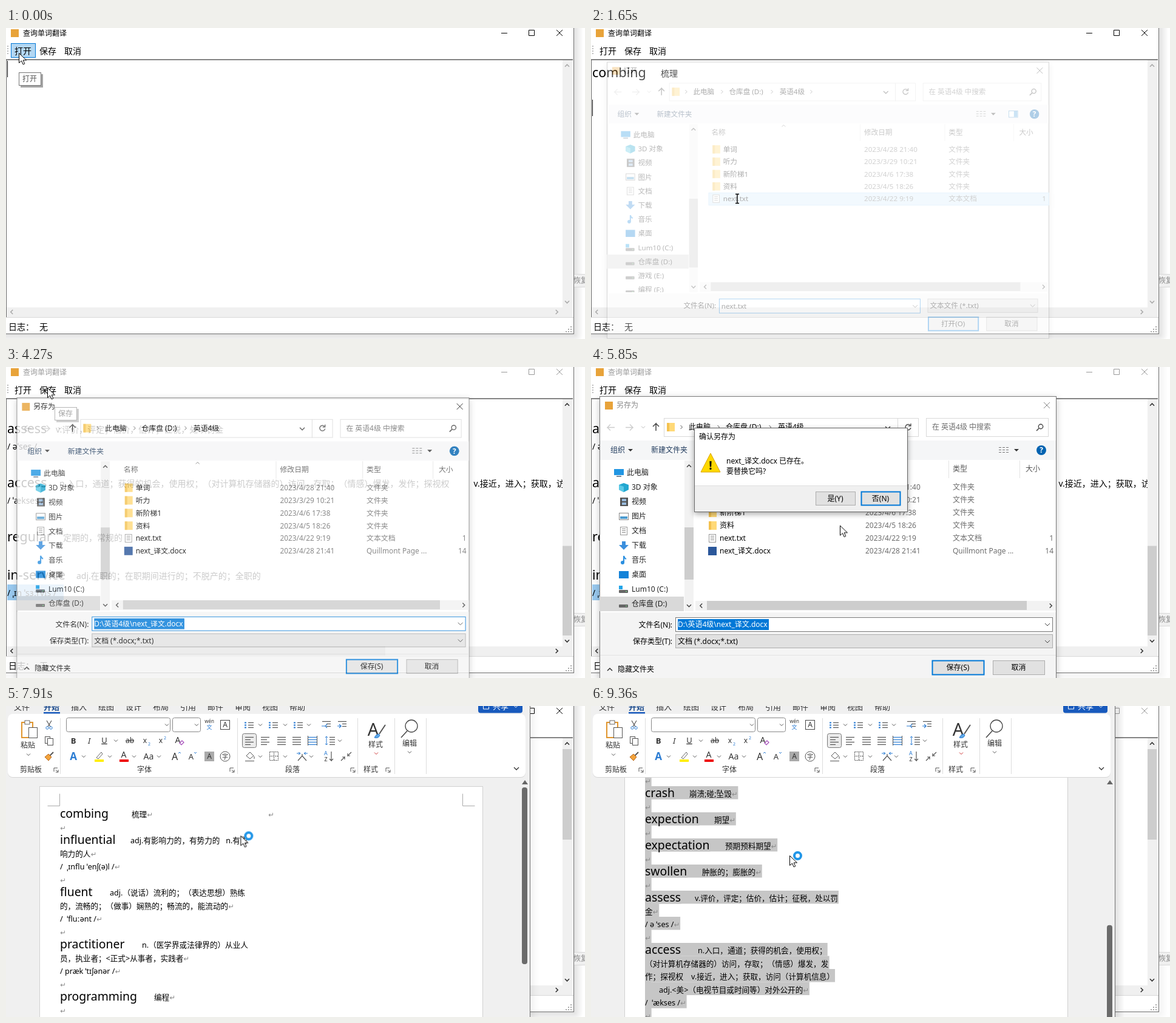
An HTML page for the animation above (9420 ms loop, 954 px wide and 512 px high).

```html
<!DOCTYPE html>
<html lang="zh-CN">
<head>
<meta charset="utf-8">
<title>查询单词翻译</title>
<style>
html,body{margin:0;width:100%;height:100%;overflow:hidden;background:#fff}
#stage{display:block;width:954px;height:512px}
text{font-family:"Noto Sans","Noto Sans CJK SC","Noto Sans CJK",sans-serif;white-space:pre;text-spacing-trim:space-all}
.ret{font-family:"DejaVu Sans",sans-serif;font-size:11.5px;fill:#8a8a8a}
.dlg{transform-origin:390px 283px;filter:drop-shadow(0 3px 6px rgba(0,0,0,.22))}
#word{transform-origin:422px 290px}
#confirm{filter:drop-shadow(0 3px 5px rgba(0,0,0,.35))}
</style>
</head>
<body>
<svg id="stage" viewBox="0 0 954 512"></svg>
<script>
const LOOP = 9420, BLUE = '#0078d7', LINE = '#d9d9d9';

// Drawing helpers
const R = (x, y, w, h, fill, more = '') => `<rect x="${x}" y="${y}" width="${w}" height="${h}" fill="${fill}" ${more}/>`;
const T = (x, y, s, size = 12, fill = '#000', more = '') =>
  `<text x="${x}" y="${y + size * .37}" font-size="${size}" fill="${fill}" ${more}>${s.replace(/</g, '&lt;')}</text>`;
const P = (d, stroke = '#444', w = 1, more = 'fill="none"') => `<path d="${d}" stroke="${stroke}" stroke-width="${w}" ${more}/>`;
const C = (x, y, r, fill, more = '') => `<circle cx="${x}" cy="${y}" r="${r}" fill="${fill}" ${more}/>`;
const G = (id, body, more = '') => `<g id="${id}" ${more}>${body}</g>`;
const clip = (x, y, w, h, body) => `<svg x="${x}" y="${y}" width="${w}" height="${h}" viewBox="${x} ${y} ${w} ${h}">${body}</svg>`;
const chev = (x, y, turn = 0, c = '#555', r = 3, w = 1) =>
  P(`M${x - r} ${y - r / 2}l${r} ${r}l${r} ${-r}`, c, w, `fill="none" transform="rotate(${turn} ${x} ${y})"`);
const tri = (x, y) => `<path d="M${x - 4} ${y - 2}h8l-4 4z" fill="#333"/>`;
const mid = 'text-anchor="middle"', end = 'text-anchor="end"';
const button = (x, y, w, h, s, main) =>
  R(x + .5, y + .5, w, h, '#e1e1e1', `stroke="${main ? BLUE : '#adadad'}" stroke-width="${main ? 2 : 1}"`) + T(x + w / 2, y + h / 2 + .5, s, 12, '#000', mid);
const shadow = (right, bottom) => [1, 2, 3, 4, 5, 6, 7]
  .map(k => R(-20, -20, right + 20 + k * 2, bottom + 20 + k * 2, '#000', `opacity=".016" rx="${k * 2}"`)).join('');

// Timeline helpers
const rules = [];
const anim = (id, frames, ease = 'linear') => {
  const all = [...frames, [LOOP, frames.at(-1)[1]]];
  rules.push(`@keyframes ${id}{${all.map(([t, css]) => `${(t / LOOP * 100).toFixed(3)}%{${css}}`).join('')}}
#${id}{animation:${id} ${LOOP}ms ${ease} infinite}`);
};
const steps = (id, frames, css) => anim(id, frames.map(([t, ...v]) => [t, css(...v)]), 'step-end');
const show = (id, ...times) => steps(id, [[0, 0], ...times.map((t, i) => [t, (i + 1) % 2])], v => `opacity:${v}`);
const fade = (id, ...frames) => anim(id, frames.map(([t, o, s = 1]) => [t, `opacity:${o};transform:scale(${s})`]));
const color = (id, ...frames) => steps(id, frames, c => `color:${c}`);

// word, editor x, document x, meaning (| breaks document lines), phonetics, time it appears
const entries = [
  ['combing', 115, 207, '梳理', '', 1590],
  ['influential', 112, 205, 'adj.有影响力的，有势力的   n.有影|响力的人', '/ ˌɪnfluˈenʃ(ə)l /', 2010],
  ['fluent', 80, 171, 'adj.（说话）流利的；（表达思想）熟练|的，流畅的；（做事）娴熟的；畅流的，能流动的', '/ ˈfluːənt /', 2250],
  ['practitioner', 140, 224, 'n.（医学界或法律界的）从业人|员，执业者；<正式>从事者，实践者', '/ prækˈtɪʃənər /', 2250],
  ['programming', 162, 244, '编程', '', 2250],
  ['crash', 75, 162, '崩溃;碰;坠毁', '', 2310],
  ['expection', 120, 203, '期望', '', 2310],
  ['expectation', 140, 221, '预期预料期望', '', 2370],
  ['swollen', 98, 183, '肿胀的；膨胀的', '', 2370],
  ['assess', 82, 171, 'v.评价，评定；估价，估计；征税，处以罚|金', '/ əˈses /', 2430],
  ['access', 88, 176, 'n.入口，通道；获得的机会，使用权；|（对计算机存储器的）访问，存取；（情感）爆发，发|作；探视权           v.接近，进入；获取，访问（计算机信息）|       adj.<美>（电视节目或时间等）对外公开的', '/ ˈækses /', 2430],
  ['regular', 94, 183, '定期的，常规的', '', 2610],
  ['in-service', 116, 200, 'adj.在职的；在职期间进行的；不脱产的；全职的', '/ ˌɪn ˈsɜːrvɪs /', 2730],
];

// Editor text and its scrolling
let ey = 53, lines = '';
const scrolls = [[0, 0, 0, 0]];
entries.forEach(([word, x, , def, phon, at], i) => {
  const row = (dy, h) => `data-top="${ey + dy}" data-h="${h}"`;
  let body = T(2, ey + 20, word, 21.5, '#000', row(0, 36)) + T(x, ey + 22, def.replace(/\|/g, ''), 14, '#000', row(0, 36));
  if (phon) body += T(2, ey + 50, phon, 14, '#000', row(36, 26));
  lines += G('e' + i, body);
  show('e' + i, at);
  ey += phon ? 89 : 63;
  const full = ey - 53 + 49;
  if (full > 430) scrolls.push([at, full - 407, 371 * (full - 407) / full, 371 * 407 / full]);
});
const total = ey - 53;
scrolls.push([7700, 0, 0, 149]);
steps('scroll', scrolls, y => `transform:translateY(${-y}px)`);
steps('thumb', scrolls, (y, top, h) => `y:${71 + top}px;height:${h}px`);
steps('caret', [[0, 54, 1], [1590, 118, 1], [2010, 205, 1], [2250, 205, 0]], (y, o) => `y:${y}px;opacity:${o}`);
show('lastSel', 2730, 6640);
show('allSel', 6640, 7700);
show('hthumb', 2430);
color('cap', [0, '#000'], [300, '#999'], [1590, '#000'], [4210, '#999'], [6400, '#000'], [8580, '#999']);
color('varrow', [0, '#aaa'], [2250, '#333']);
color('harrow', [0, '#aaa'], [2430, '#333']);
steps('glow', [[0, 1], [300, .4], [1590, 1], [4210, .4], [6400, 1], [8580, .4]], v => `opacity:${v}`);
show('hotOpen', 0, 250);
show('hotSave', 2800, 4150);

const dots = [[930, 491], [926, 495], [930, 495], [922, 499], [926, 499], [930, 499]].map(([x, y]) => R(x, y, 2, 2, '#aaa')).join('');
const appIcon = (x, y) => R(x, y, 13, 13, '#e8a33a');
const hot = (id, x) => G(id, R(x + .5, 25.5, 40, 23, '#b3d7f3', `stroke="${BLUE}"`));

const main = G('glow', shadow(936, 504)) +
  R(930, 405.5, 30, 21, '#f0f0f0', `stroke="${LINE}"`) + T(935, 416, '恢复', 12, '#888') +
  R(-1, -2, 936.5, 505.5, '#fff', 'stroke="#707070"') +
  appIcon(8, 2) +
  G('cap', T(28, 9, '查询单词翻译', 12, 'currentColor') +
    P('M816 8.5h10M861.5 3.5h9v9h-9zM907 3l10 10M917 3l-10 10', 'currentColor')) +
  [29, 33, 37, 41].map(y => R(2, y, 2, 2, '#bbb')).join('') +
  hot('hotOpen', 8) + hot('hotSave', 49) +
  T(14, 38, '打开', 14) + T(55, 38, '保存', 14) + T(96, 38, '取消', 14) +
  P('M0 51.5h934', '#a0a0a0') + P('M0 52.5h934M.5 52v424', '#696969') +
  clip(1, 53, 916, 407, G('scroll', G('allSel', '') +
    G('lastSel', R(2, ey - 53, 93, 26, '#99c9ef')) + lines) + R(2, 54, 1, 27, '#000', 'id="caret"')) +
  R(917, 53, 17, 424, '#f0f0f0') + R(1, 460, 917, 17, '#f0f0f0') +
  R(917, 71, 15, 0, '#cdcdcd', 'id="thumb"') + R(18, 460, 607, 15, '#cdcdcd', 'id="hthumb"') +
  G('varrow', chev(924.5, 62, 180, 'currentColor', 3.5, 1.6) + chev(924.5, 451, 0, 'currentColor', 3.5, 1.6)) +
  G('harrow', chev(9.5, 467.5, 90, 'currentColor', 3.5, 1.6) + chev(907.5, 467.5, -90, 'currentColor', 3.5, 1.6)) +
  P('M0 476.5h935', LINE) + T(4, 492, '日志：', 14) + T(55, 492, '无', 14) + dots;

// File dialogs
const folder = (x, y) => R(x, y - 7, 13, 14, '#ffd978') + R(x, y - 7, 4, 14, '#f3c14f');
const sheet = (x, y) => R(x + .5, y - 6.5, 11, 13, '#fff', 'stroke="#999"') + P(`M${x + 3} ${y - 3.5}h6m-6 3h6m-6 3h6`, '#888');
const screen = (x, y) => R(x, y - 6, 16, 10, '#2196e3') + R(x + 4, y + 5, 8, 2, '#789');
const drive = (x, y) => R(x, y + 1, 15, 5, '#666', 'rx="1"') + R(x + 11, y + 3, 2, 1, '#7e8');
const places = [
  ['此电脑', screen],
  ['3D 对象', (x, y) => `<path d="M${x} ${y - 4}l8-3 8 3v8l-8 4-8-4z" fill="#22a7d0"/><path d="M${x} ${y - 4}l8 3v9l-8-4z" fill="#5cc9e6"/>`],
  ['视频', (x, y) => R(x + 2, y - 7, 13, 14, '#555') + R(x + 5, y - 5, 7, 4, '#9bd') + R(x + 5, y + 1, 7, 4, '#9bd')],
  ['图片', (x, y) => R(x + .5, y - 5.5, 15, 11, '#fff', 'stroke="#888"') + R(x + 2, y, 12, 4, '#4b9bd0')],
  ['文档', (x, y) => sheet(x + 2, y)],
  ['下载', (x, y) => `<path d="M${x + 5} ${y - 7}h6v6h5l-8 8-8-8h5z" fill="#3b8fdd"/>`],
  ['音乐', (x, y) => C(x + 6, y + 4, 3, '#2a8fe0') + P(`M${x + 8} ${y + 4}v-11q1 4 4 5`, '#2a8fe0', 2)],
  ['桌面', (x, y) => R(x, y - 6, 16, 12, '#1583d8')],
  ['Lum10 (C:)', (x, y) => drive(x, y) + R(x, y - 6, 6, 6, '#22a4e8')],
  ['仓库盘 (D:)', drive], ['游戏 (E:)', drive], ['编程 (F:)', drive],
];
const files = [
  ['单词', '2023/4/28 21:40'], ['听力', '2023/3/29 10:21'], ['新阶梯1', '2023/4/6 17:38'], ['资料', '2023/4/5 18:26'],
  ['next.txt', '2023/4/22 9:19', '文本文档', '1'], ['next_译文.docx', '2023/4/28 21:41', 'Quillmont Page ...', '14'],
];
const dialog = save => {
  const bottom = save ? 402 : 440, shift = save ? 0 : -2, vx = save ? 680 : 651;
  const side = places.map(([name, icon], i) => {
    const y = 174 + shift + 24 * i, x = i ? 46 : 38;
    return (i == 9 ? R(14, y - 12, 139, 24, '#d9d9d9') : '') + icon(x, y) + T(x + 21, y, name, 12, '#222');
  }).join('');
  const rows = files.slice(0, save ? 6 : 5).map(([name, date, type = '文件夹', size = ''], i) => {
    const y = 198 + shift / 2 + 21 * i;
    const icon = i < 4 ? folder(194, y) : i == 4 ? sheet(194, y) : R(193, y - 7, 14, 14, '#2b579a');
    return icon + T(212, y, name) + T(452, y, date, 12, '#6d6d6d') + T(596, y, type, 12, '#6d6d6d') + T(762, y, size, 12, '#6d6d6d', end);
  }).join('');
  const foot = save ?
    T(134, 425, '文件名(N):', 12, '#000', end) + G('nameBox', R(139.5, 412.5, 621, 23, '#fff', 'stroke="currentColor"')) +
    R(143, 415, 150, 18, BLUE) + T(143, 424, 'D:\\英语4级\\next_译文.docx', 12, '#fff') + chev(752, 424, 0, '#444', 4) +
    T(134, 452, '保存类型(T):', 12, '#000', end) + R(139.5, 440.5, 621, 22, '#e1e1e1', 'stroke="#adadad"') +
    T(143, 452, '文档 (*.docx;*.txt)') + chev(752, 452, 0, '#444', 4) +
    P('M15 474.5h751', '#e2e2e2') + chev(31, 498, 180, '#333', 4, 1.5) + T(44, 498, '隐藏文件夹') +
    button(562, 483, 85, 23, '保存(S)', 1) + button(662, 483, 85, 23, '取消') :
    T(200, 463, '文件名(N):', 12, '#000', end) + R(205.5, 451.5, 342, 24, '#fff', `stroke="${BLUE}"`) +
    T(209, 464, 'next.txt') + chev(539, 464, 0, '#444', 4) +
    R(560.5, 451.5, 187, 23, '#e1e1e1', 'stroke="#adadad"') + T(564, 463, '文本文件 (*.txt)') + chev(739, 463, 0, '#444', 4) +
    button(561, 482, 85, 23, '打开(O)', 1) + button(660, 482, 86, 23, '取消');
  return R(14.5, 48.5, 752, 470, '#fff', 'stroke="#7a7a7a"') + appIcon(23, 57) +
    T(42, 63, save ? '另存为' : '打开', 12, save ? 'currentColor' : '#000') +
    P('M746 58l10 10M756 58l-10 10', save ? 'currentColor' : '#222') +
    P('M39 99.5h-12l5-5m-5 5l5 5M57 99.5h12l-5-5m5 5l-5 5', '#ccc', 1.3) + chev(86, 99, 0, '#bbb') +
    P('M107 105v-12l-5 5m5-5l5 5', '#444', 1.5) +
    R(120.5, 84.5, 385, 30, '#fff', `stroke="${LINE}"`) + R(505.5, 84.5, 34, 30, '#fff', `stroke="${LINE}"`) +
    R(552.5, 84.5, 201, 30, '#fff', `stroke="${LINE}"`) +
    folder(125, 99) + chev(149, 99, -90) + T(161, 99, '此电脑') + chev(210, 99, -90) + T(222, 99, '仓库盘 (D:)') +
    chev(295, 99, -90) + T(308, 99, '英语4级') + (save ? '' : chev(362, 99, -90)) +
    chev(489, 100, 0, '#444', 4, 1.5) + P('M526 96a4.5 4.5 0 1 0 1 4M527 93v4h-4', '#555', 1.4) +
    T(562, 99, '在 英语4级 中搜索', 12, '#6d6d6d') + C(741, 98, 3.7, 'none', 'stroke="#444" stroke-width="1.4"') + P('M738 101l-4 4', '#444', 1.6) +
    R(15, 121, 751, 32, '#f5f6f7') + T(32, 137, '组织', 12, '#1e395b') + tri(65, 137) + T(99, 137, '新建文件夹', 12, '#1e395b') +
    P(`M${vx - 8} 132.5h4m2 0h4m2 0h4M${vx - 8} 136.5h4m2 0h4m2 0h4M${vx - 8} 140.5h4m2 0h4m2 0h4`, '#777') + tri(vx + 21, 137) +
    (save ? '' : R(698.5, 131.5, 15, 11, '#fff', 'stroke="#4a90c8"') + R(707, 132, 6, 10, '#5aa7e0')) +
    C(742, 137, 8, '#0063b1') + T(742, 137, '?', 12, '#fff', mid + ' font-weight="700"') +
    (save ? '' : R(187.5, 271, 579, 21, '#d4eafa', 'stroke="#b3dcf7"')) +
    T(192, 168, '名称', 12, '#555') + T(452, 168, '修改日期', 12, '#555') + T(596, 168, '类型', 12, '#555') + T(716, 168, '大小', 12, '#555') +
    chev(315, 157, 180, '#777') + P('M445.5 154v29M589.5 154v29M706.5 154v29', '#e3e3e3') +
    rows + clip(14, 154, 156, bottom - 154, side) +
    R(154, 154, 15, bottom - 154, '#f2f2f2') + R(154, save ? 264 : 281, 15, save ? 86 : 117, '#cdcdcd') +
    chev(161.5, 163, 180, '#444', 3.5, 1.5) + chev(161.5, bottom - 9, 0, '#444', 3.5, 1.5) +
    R(172, bottom - 17, 594, 16, '#f2f2f2') + R(191, bottom - 17, 527, 15, '#cdcdcd') +
    chev(181.5, bottom - 9, 90, '#444', 3.5, 1.5) + chev(757.5, bottom - 9, -90, '#444', 3.5, 1.5) +
    R(15, bottom + 2, 751, 516 - bottom, '#f4f4f4') + foot;
};
fade('openDlg', [0, 0, .95], [270, 0, .95], [400, .8, .99], [510, 1], [1530, 1], [1650, .32, .968], [1710, 0, .95]);
fade('saveDlg', [0, 0, .95], [4150, 0, .955], [4270, .8, .9907], [4390, 1], [6280, 1], [6400, .3, .97], [6460, 0, .95]);
color('saveText', [0, '#000'], [5730, '#888'], [6200, '#000']);
color('nameBox', [0, BLUE], [5730, '#7a7a7a']);
anim('confirm', [[0, 'opacity:0'], [5700, 'opacity:0'], [5840, 'opacity:1'], [6200, 'opacity:1'], [6280, 'opacity:0']]);
const confirmBox = R(170.5, 100.5, 351, 138, '#fff', 'stroke="#666"') + T(178, 115, '确认另存为') +
  '<path d="M197 142l16 31h-32z" fill="#ffd800" stroke="#d9a400"/>' + T(197, 162, '!', 19, '#000', mid + ' font-weight="700"') +
  T(223, 155, 'next_译文.docx 已存在。') + T(223, 172, '要替换它吗?') +
  R(171, 195, 350, 43, '#f0f0f0') + P('M171 195.5h350', '#dfdfdf') +
  button(370, 205, 65, 22, '是(Y)') + button(445, 205, 64, 22, '否(N)', 1);

// Tooltips
const tip = (id, x, y, s) => G(id, R(x + 3, y + 3, 37, 22, '#000', 'opacity=".35"') +
  R(x + .5, y + .5, 36, 21, '#fff', 'stroke="#767676"') + T(x + 6, y + 11, s, 12, '#555'));
show('tipOpen', 0, 250);
anim('tipSave', [[0, 'opacity:0'], [3120, 'opacity:0'], [3360, 'opacity:1'], [4220, 'opacity:1'], [4330, 'opacity:0']]);

// Word processor
const bars = (x, y, ws, c = '#555') => ws.map((w, i) => P(`M${x} ${y - 5.5 + i * 4}h${w}`, c, 1.2)).join('');
const list = (x, y) => bars(x - 2, y, [9, 9, 9]) + [0, 4, 8].map(d => R(x - 8, y - 6.5 + d, 3, 2, '#2b7cd3')).join('');
const indent = (x, dir) => bars(x - 7, 31, [14]) + bars(x, 35, [7, 7]) + P(`M${x - 8} 33h6l${dir * -3}-3m${dir * 3} 3l${dir * -3} 3`, '#2b7cd3', 1.2);
const L = (x, y, s, size = 14, more = '', c = '#333') => T(x, y, s, size, c, mid + ' ' + more);
const launch = x => P(`M${x - 4} 108v-6h6M${x - 1} 105l4 4m0-4v4h-4`, '#555');
const downs = [[37, 80], [265, 31], [314, 31], [181, 57], [128, 83], [171, 83], [211, 83], [252, 83], [419, 31], [460, 31], [499, 31],
  [550, 57], [419, 83], [460, 83], [503, 83], [665, 76]].map(([x, y]) => chev(x, y)).join('');
const tabs = ['文件', '开始', '插入', '绘图', '设计', '布局', '引用', '邮件', '审阅', '视图', '帮助']
  .map((s, i) => T(i ? 17 + 45 * i : 13, 1, s, 13, i == 1 ? '#1f4e8f' : '#333', i == 1 ? 'font-weight="700"' : '')).join('');
const share = (fill, ink) => R(778, -10, 73, 21.5, fill, 'rx="4"') + P('M786.5 -2v7h9v-4', ink) + T(802, 0, '共享', 13, ink) + chev(840, 1, 0, ink);
const ribbon = R(3, 14, 853, 104, '#d5d5d5', 'rx="8"') + R(3, 13, 853, 104, '#fff', 'rx="8"') + tabs + R(62, 10, 27, 2.5, '#185abd') +
  share('#ececec', '#999') + G('share', share('#185abd', '#fff')) +
  P('M89.5 20v92M381.5 20v92M579.5 20v92M640.5 20v92M692.5 20v92', '#ddd') +
  R(26, 27, 18, 25, '#fff', 'stroke="#e0952e" stroke-width="2"') + R(31, 24, 8, 6, '#fff', 'stroke="#666"') + R(37.5, 35.5, 14, 17, '#fff', 'stroke="#555"') +
  L(36, 65, '粘贴', 12) + P('M67 24l6 10M75 24l-6 10', '#555', 1.2) + C(68, 36, 2.2, 'none', 'stroke="#2b7cd3"') + C(74, 36, 2.2, 'none', 'stroke="#2b7cd3"') +
  R(64.5, 50.5, 8, 11, '#fff', 'stroke="#555"') + R(68.5, 53.5, 9, 11, '#fff', 'stroke="#555"') +
  P('M78 76l-6 6', '#555', 2) + '<path d="M70 79l5 5-5 6-6-6z" fill="#f2a33c" stroke="#b8661a"/>' +
  R(99.5, 19.5, 171, 23, '#fff', 'stroke="#888" rx="3"') + R(274.5, 19.5, 46, 23, '#fff', 'stroke="#888" rx="3"') +
  L(335, 25, 'wén', 8) + L(335, 35, '文', 9, '', '#2b7cd3') + R(353.5, 23.5, 15, 15, '#fff', 'stroke="#444"') + L(361, 31, 'A', 12) +
  L(111, 57, 'B', 13, 'font-weight="700"') + L(137, 57, 'I', 13, 'font-style="italic"') + L(162, 56, 'U', 13, 'text-decoration="underline"') +
  L(204, 57, 'ab', 12, 'text-decoration="line-through"') + L(229, 57, 'x', 12) + L(236, 62, '2', 7, '', '#2b7cd3') +
  L(255, 57, 'x', 12) + L(262, 52, '2', 7, '', '#2b7cd3') + L(283, 56, 'A', 14) + P('M286 61l4-4 3 3-4 4z', '#a348b8', 1.2) +
  L(111, 83, 'A', 17, 'font-weight="700"', '#2b7cd3') + P('M149 85l8-9 2 3-7 8z', '#666') + R(146, 88, 15, 4, '#ffee00') +
  L(194, 80, 'A', 14) + R(187, 88, 15, 4, '#e00') + L(235, 83, 'Aa', 14) + L(278, 83, 'A', 16) + chev(286, 77, 180, '#2b7cd3', 2) +
  L(305, 83, 'A', 13) + chev(312, 77, 0, '#2b7cd3', 2) + R(327, 75, 16, 16, '#aaa') + L(335, 83, 'A', 12) +
  C(361, 83, 8, 'none', 'stroke="#555"') + L(361, 83, '字', 10) +
  [401, 441, 482].map(x => list(x, 33)).join('') + indent(528, -1) + indent(554, 1) +
  R(389.5, 45.5, 23, 23, '#ebebeb', 'stroke="#777" rx="3"') + bars(394, 57, [14, 9, 14, 9]) + bars(420, 57, [14, 10, 14, 10]) +
  bars(447, 57, [14, 14, 14, 14]) + bars(472, 57, [14, 14, 14, 14]) + bars(498, 57, [14, 14, 14, 14], '#2b7cd3') + P('M497.5 49v16M512.5 49v16', '#555') +
  bars(533, 57, [9, 9, 9, 9]) + P('M528 50v14m-2-12l2-2 2 2m-4 10l2 2 2-2', '#2b7cd3') +
  P('M396 82l6-6 6 6-6 5zM409 83v4', '#555') + R(394, 89, 15, 3, '#bbb') + P('M434.5 75.5h14v14h-14zM441.5 75v15M434 82.5h15', '#555', 1, 'fill="none" stroke-dasharray="2 1"') +
  P('M481 90l7-8 7 8M488 82v-3', '#555', 1.2) + P('M479 78h6m-3-2l3 2-3 2M497 78h-6m3-2l-3 2 3 2', '#2b7cd3') +
  L(527, 78, 'A', 9, '', '#2b7cd3') + L(527, 88, 'Z', 9) + P('M536 75v15l-3-3m3 3l3-3', '#555', 1.2) + P('M569 76l-6 6v-4m0 4h4M552 90l6-6v4m0-4h-4', '#555', 1.2) +
  L(605, 38, 'A', 29) + P('M625 31l-10 15', '#555', 2) + P('M614 46q-5 1-7 6q7 2 9-4z', '#2b7cd3', 1, 'fill="#5fa8e6"') +
  L(609, 64, '样式', 12) + chev(610, 78, 0, '#c33') + C(668, 33, 10, 'none', 'stroke="#444" stroke-width="1.3"') + P('M661 41l-10 11', '#444', 1.5) + L(665, 62, '编辑', 12) +
  [[41, '剪贴板'], [228, '字体'], [472, '段落'], [601, '样式']].map(([x, s]) => L(x, 105, s, 12)).join('') +
  [83, 373, 572, 630].map(launch).join('') + chev(841, 103, 0, '#333', 4, 1.3) + downs;

const ret = '<tspan class="ret">↵</tspan>';
const mark = (svgText, yes = true) => yes ? svgText.replace('</text>', ret + '</text>') : svgText;
let dy = 176.5, docText = '';
for (const [word, , x, def, phon] of entries) {
  const put = (px, off, s, size) => T(px, dy + off, s, size, '#000', `data-top="${dy - 10.5}" data-h="21.5"`);
  const parts = def.replace(/ {9,}/, '    ').split('|');
  docText += put(89, 0, word, 19.4);
  parts.forEach((s, i) => {
    docText += mark(put(i ? 89 : x, 2, s, 12.6), i == parts.length - 1);
    if (i < parts.length - 1) dy += 21.5;
  });
  if (phon) { dy += 21.5; docText += mark(put(89, 2, phon.replace(/[ˈˌ]/g, ' $&'), 12.6)); }
  dy += 21.5;
  docText += mark(put(89, 2, '', 12.6));
  dy += 21.5;
}
const page = (x, w) => R(x + .5, 132.5, w, 1200, '#fff', 'stroke="#d0d0d0"');
const corners = (l, r, y) => P(`M${l - 20} ${y}h20v-20M${r + 20} ${y}h-20v-20`, '#aaa');
const word = G('wordGlow', shadow(864, 700)) + R(-20, -20, 883.5, 700, '#f0f0f0', 'stroke="#707070"') +
  clip(0, 117, 850, 560,
    G('blank', page(64, 712) + corners(173.5, 669.5, 218.5) + mark(T(174, 228, ''))) +
    G('doc', G('docScroll', page(55, 730) + corners(88.5, 752.5, 164.5) + G('docSel', '') + docText + mark(T(432, 179, ''))))) +
  '<path d="M850 129l5-7 5 7z" fill="#666"/>' + R(850, 134, 9, 275, '#6b6b6b', 'rx="4" id="docThumb"') + ribbon;
fade('word', [0, 0, .95], [7350, 0, .955], [7440, .56, .979], [7550, 1]);
steps('wordGlow', [[0, .4], [8580, 1]], v => `opacity:${v}`);
show('share', 7610);
show('blank', 0, 7790);
show('doc', 7790);
show('docSel', 8640);
const docSteps = [[0, 0], [8820, 86], [8940, 172], [9060, 258], [9180, 344], [9300, 378]];
steps('docScroll', docSteps, s => `transform:translateY(${-s}px)`);
steps('docThumb', [[0, 0, 275], [7790, 0, 291], ...docSteps.slice(1).map(([t, s]) => [t, s * .6, 291])], (s, h) => `y:${134 + s}px;height:${h}px`);

// Pointer
anim('pointer', [[0, 21, 41], [510, 21, 41], [1030, 241, 281], [2250, 241, 281], [2850, 78, 44], [3540, 78, 44], [3660, 68, 34],
  [4840, 68, 34], [5480, 596, 492], [5730, 596, 492], [5850, 410, 261], [5990, 402, 214], [6460, 402, 214], [6700, 387, 214],
  [8580, 386, 213], [9000, 327, 246]].map(([t, x, y]) => [t, `transform:translate(${x}px,${y}px)`]));
show('arrow', 0, 1590, 2700, 6460, 7560);
show('beam', 1590, 2700, 6460, 7560);
show('ring', 7560);
const pointer = G('arrow', P('M.5.5v16l4-3.5 2.7 6 2.6-1.2-2.6-5.8h5.3z', '#000', 1, 'fill="#fff"')) +
  G('beam', P('M-3-7.5h2.5l.5.5.5-.5h2.5M0-7v14M-3 7.5h2.5l.5-.5.5.5h2.5', '#000', 1.4)) +
  G('ring', C(13.5, .5, 5.5, '#fff', 'stroke="#2196e8" stroke-width="4"'));

const stage = document.getElementById('stage');
stage.innerHTML = main + G('openDlg', dialog(false), 'class="dlg"') +
  G('saveDlg', G('saveText', dialog(true)), 'class="dlg"') + G('confirm', confirmBox) +
  tip('tipOpen', 21, 73, '打开') + tip('tipSave', 80, 66, '保存') + G('word', word) + G('pointer', pointer);

// Selection bands follow the measured text
const select = (target, source, left, fill, base) => {
  const bands = [...document.querySelectorAll(source + ' text[data-top]')].map(t => {
    const box = t.getBBox();
    return R(left, t.dataset.top, Math.max(5, box.x + box.width + 1 - left), t.dataset.h, fill);
  });
  document.getElementById(target).innerHTML = base + bands.join('');
};
select('allSel', '#scroll', 2, '#99c9ef', R(2, 53, 5, total + 27, '#99c9ef'));
select('docSel', '#docScroll', 89, '#c6c6c6', R(89, 166, 10, dy - 166, '#c6c6c6'));
document.head.appendChild(document.createElement('style')).textContent = rules.join('\n');
</script>
</body>
</html>
```
